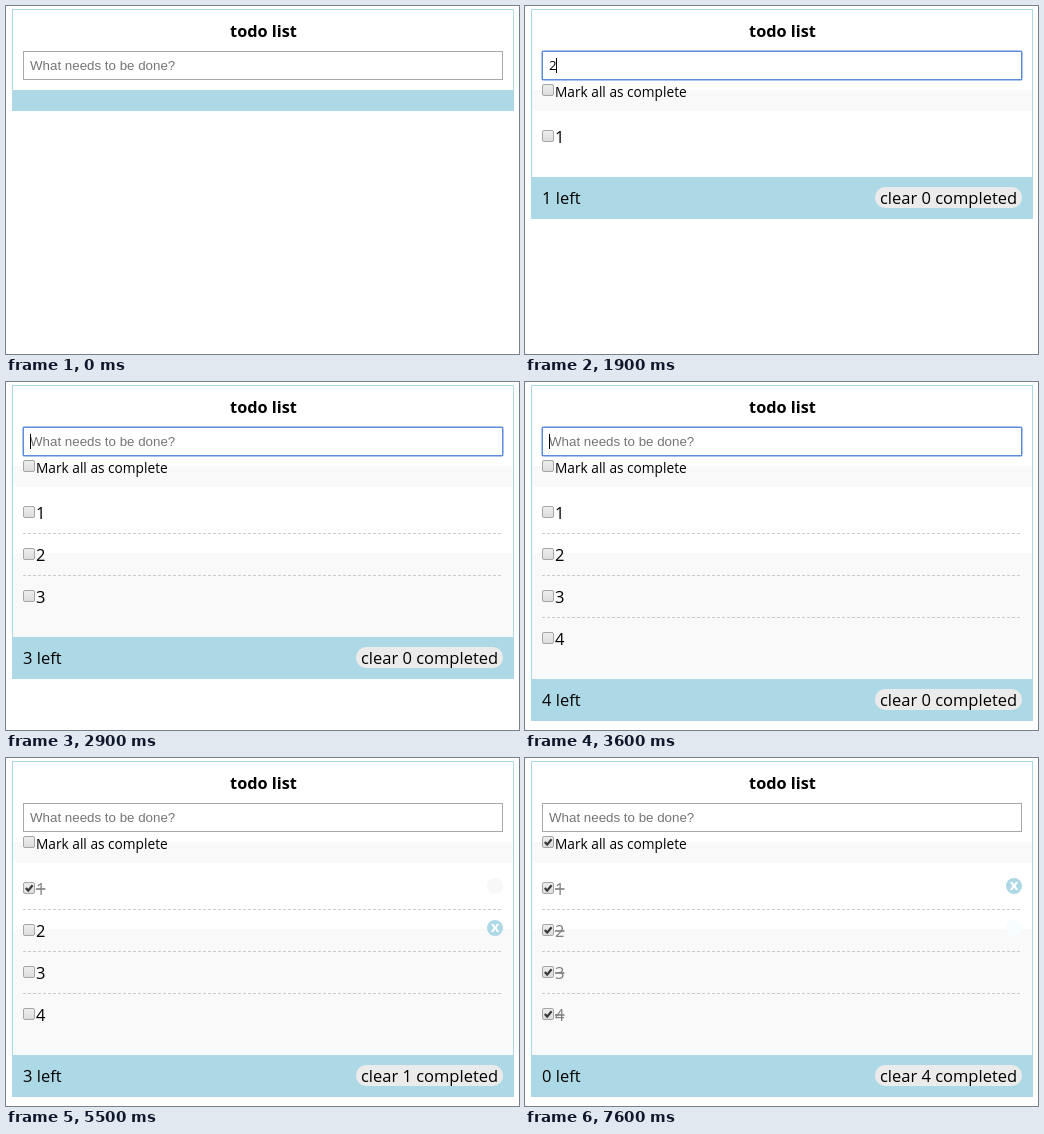
Write an HTML page that moves like this. It is 513 by 348 pixels and loops after 8000 ms.

```html
<!DOCTYPE html>
<html lang="en">
<head>
<meta charset="utf-8">
<title>todo list</title>
<style>
  html, body { margin: 0; width: 513px; height: 348px; overflow: hidden; background: #fff; }
  svg { display: block; }
  text { font: 16.5px "Open Sans", "Noto Sans", sans-serif; }
  .title { font-size: 16.3px; font-weight: 700; text-anchor: middle; }
  .hint { font: 13.333px "Liberation Sans", Arial, sans-serif; fill: #757575; }
  .typed { font-size: 13.333px; }
  .mark { font-size: 13.7px; }
  .done { fill: #808080; text-decoration: line-through; }
  .x { font-size: 15px; font-weight: 700; fill: #fff; text-anchor: middle; }
</style>
</head>
<body>
<svg width="513" height="348">
  <defs>
    <linearGradient id="up" x2="0" y2="1"><stop stop-color="#eee"/><stop offset="1" stop-color="#dcdcdc"/></linearGradient>
    <linearGradient id="down" x2="0" y2="1"><stop stop-color="#d4d4d4"/><stop offset="1" stop-color="#e4e4e4"/></linearGradient>
  </defs>
  <g id="app"></g>
</svg>
<script>
const LOOP = 8000, BLUE = '#add8e6', ROW = 42;
const app = document.getElementById('app');

// Each step changes part of the state at its time.
// done: bit per item; press: pressed box (-1 = mark all); x: row whose delete button shows; faint: rows with a faded button
const steps = [
  [0, { count: 0, focus: false, caret: false, typed: '', done: 0, all: false, press: null, hover: false, x: null, faint: [] }],
  [500, { focus: true, caret: true }],
  [1000, { caret: false }],
  [1400, { caret: true, typed: '1' }],
  [1600, { typed: '', count: 1 }],
  [1900, { typed: '2' }],
  [2200, { typed: '', count: 2 }],
  [2500, { typed: '3' }],
  [2900, { typed: '', count: 3 }],
  [3300, { typed: '4' }],
  [3600, { typed: '', count: 4 }],
  [4100, { caret: false }],
  [4600, { caret: true, x: 0 }],
  [5000, { caret: false, hover: true }],
  [5200, { focus: false, press: 0 }],
  [5300, { press: null, hover: false, done: 1 }],
  [5500, { x: 1, faint: [0] }],
  [5900, { press: 1 }],
  [6000, { press: null, done: 3 }],
  [6200, { x: 0, faint: [1] }],
  [6300, { x: null, faint: [0, 1] }],
  [6700, { press: -1 }],
  [6800, { press: null, done: 15, all: true }],
  [7600, { x: 0, faint: [1] }]
];

const rect = (x, y, w, h, fill, more = '') => `<rect x="${x}" y="${y}" width="${w}" height="${h}" fill="${fill}" ${more}/>`;
const text = (x, y, s, cls = '') => `<text x="${x}" y="${y}" class="${cls}">${s}</text>`;
const frame = (x, y, w, h, color, r = 0) => rect(x + .5, y + .5, w - 1, h - 1, 'none', `stroke="${color}" rx="${r}"`);

function checkbox(y, checked, pressed) {
  const tick = `<path d="M19.8 ${y + 6}l2.4 2.6 4.4-5.4" fill="none" stroke="#383838" stroke-width="2.2"/>`;
  return rect(17.5, y + .5, 11, 11, `url(#${pressed ? 'down' : 'up'})`, 'stroke="#a6a6a6" rx="1.5"') + (checked ? tick : '');
}

function input(s) {
  let out = s.focus
    ? frame(16, 44, 482, 31, '#a9c4f0', 2) + frame(17, 45, 480, 29, '#5d8cda')
    : frame(17, 45, 480, 29, '#a9a9a9');
  out += s.typed ? text(24, 64, s.typed, 'typed') : text(24, 64, 'What needs to be done?', 'hint');
  if (s.caret) out += rect(s.typed ? 31 : 24, 52, 1, 15, '#000');
  return out;
}

function item(s, i) {
  const y = 124 + ROW * i, done = s.done >> i & 1;
  let out = checkbox(y, done, s.press === i) + text(30, y + 13, i + 1, done ? 'done' : '');
  if (s.hover && i === 0) out += rect(18, y + 1, 10, 2, '#f5f5f5');
  if (i) out += `<path d="M17 ${y - 14.5}H497" stroke="#ccc" stroke-dasharray="3 2"/>`;
  const circle = fill => `<circle cx="489" cy="${y + 4}" r="8" fill="${fill}"/>`;
  if (s.x === i) out += circle(BLUE) + text(489, y + 8, 'x', 'x');
  else if (s.faint.includes(i)) out += circle(i ? '#f6feff' : '#f8f8f8');
  return out;
}

function view(s) {
  const n = s.count, top = n ? 129 + ROW * n : 84, height = n ? ROW : 21;
  let out = '';
  if (n) out += rect(7, 84, 500, 21, '#f9f9f9');
  if (n > 1) out += rect(7, 171, 500, top - 171, '#f9f9f9');
  out += frame(6, 3, 502, top + height - 3, BLUE) + rect(6, top, 502, height, BLUE);
  out += text(257.5, 31, 'todo list', 'title') + input(s);
  if (!n) return out;

  out += checkbox(78, s.all, s.press === -1) + text(30, 91, 'Mark all as complete', 'mark');
  let completed = 0;
  for (let i = 0; i < n; i++) {
    out += item(s, i);
    completed += s.done >> i & 1;
  }
  return out + text(17, top + 27, `${n - completed} left`)
    + rect(350, top + 10, 147, 21, '#ebebeb', 'rx="10"')
    + text(355, top + 27, `clear ${completed} completed`);
}

const start = performance.now();
let shown = -1;
function draw() {
  const t = (performance.now() - start) % LOOP;
  const past = steps.filter(([at]) => at <= t);
  if (past.length !== shown) {
    shown = past.length;
    app.innerHTML = view(Object.assign({}, ...past.map(([, change]) => change)));
  }
  requestAnimationFrame(draw);
}
draw();
</script>
</body>
</html>
```
